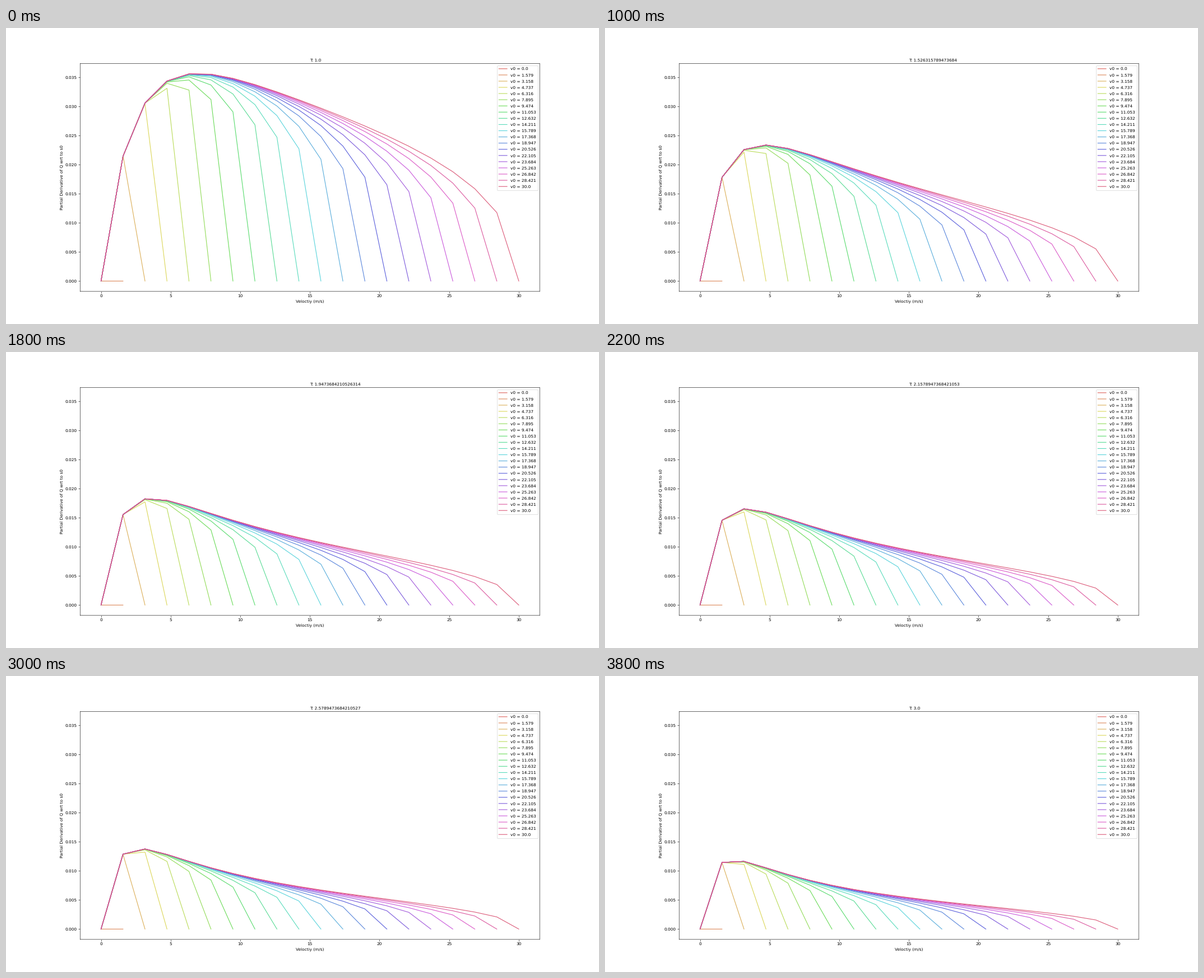
A matplotlib script that plays this animation: 1058 by 529 pixels, repeating every 4 s.

```python
import colorsys

import matplotlib.pyplot as plt
import numpy as np
from matplotlib.animation import FuncAnimation

plt.rcParams["font.family"] = "DejaVu Sans"
plt.rcParams["text.hinting"] = "none"

COUNT = 20
GAP, LENGTH = 2.0, 5.0  # standstill gap and vehicle length, metres
DPI = 52.9
EM = 10 * DPI / 72      # font size in pixels
ROW = 1.507             # legend row pitch in font sizes

speeds = np.linspace(0, 30, COUNT)
headways = np.linspace(1, 3, COUNT)
colors = [colorsys.hls_to_rgb((0.01 + i / COUNT) % 1, 0.6, 0.65)
          for i in range(COUNT)]


def sensitivity(v, v0, headway):
    """Size of dQ/ds0 for equilibrium traffic in the intelligent driver model."""
    if v0 == 0:
        return np.zeros_like(v)
    w = np.sqrt(1 - (v / v0) ** 4)
    return v * w / (GAP + v * headway + LENGTH * w) ** 2


fig, ax = plt.subplots(figsize=(20, 10), dpi=DPI)
lines = []
for i, v0 in enumerate(speeds):
    v = speeds[:i + 1]
    line, = ax.plot(v, sensitivity(v, v0, headways[0]), color=colors[i],
                    label=f"v0 = {round(float(v0), 3)}")
    lines.append(line)

peak = sensitivity(speeds, speeds[-1], headways[0]).max()
ax.set_xlim(-1.5, 31.5)
ax.set_ylim(-0.05 * peak, 1.05 * peak)
ax.set_xlabel("Veloctiy (m/s)")
ax.set_ylabel("Partial Derivative of Q wrt to s0")
title = ax.text(0.5, 1.01, "lp", transform=ax.transAxes)

# Text height varies with font rendering, so space the rows around it.
text_height = title.get_window_extent().height
legend = ax.legend(loc="upper right", labelspacing=ROW - text_height / EM)

for artist in [*lines, *legend.get_lines(), *ax.spines.values()]:
    artist.set_snap(False)


def update(frame):
    headway = float(headways[frame])
    for i, line in enumerate(lines):
        line.set_ydata(sensitivity(speeds[:i + 1], speeds[i], headway))
    title.set_text(f"T: {headway}")
    return [*lines, title]


anim = FuncAnimation(fig, update, frames=COUNT, interval=200,
                     repeat=True, repeat_delay=0, blit=False)
plt.show()
```
